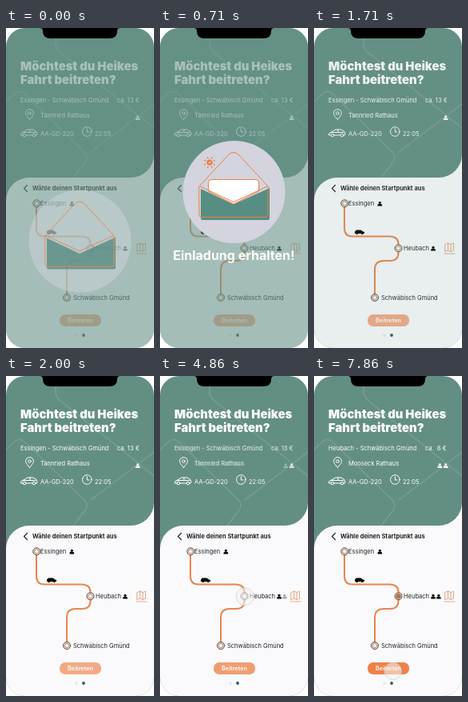
Animation, 185 px wide and 400 px high, one loop 8000 ms. Source, as an HTML page:

```html
<!DOCTYPE html>
<html lang="de">
<head>
<meta charset="utf-8">
<title>Mitfahrt</title>
<style>
  html, body { margin: 0; width: 100%; height: 100%; overflow: hidden; }
  svg { display: block; width: 100vw; height: 100vh; font: 7.5px Inter, sans-serif; }
  .line { fill: none; stroke-linecap: round; stroke-linejoin: round; }
  .title { font-size: 14.8px; font-weight: 900; }
  .bold { font-weight: 700; }
</style>
</head>
<body>
<svg viewBox="0 0 185 400">
  <defs>
    <clipPath id="screen"><rect width="185" height="400" rx="24"/></clipPath>
    <g id="person">
      <circle cy="-1.2" r="1.6"/>
      <path d="M-2.8 2.9V1.6Q-2.8 .6 -1.5 .6H1.5Q2.8 .6 2.8 1.6V2.9Z"/>
    </g>
    <g id="stop">
      <circle r="4.5" fill="#f4e6dc" stroke="#54453d"/>
      <circle r="2.6" fill="#fff" stroke="#a0694b" stroke-width=".8"/>
    </g>
  </defs>

  <g clip-path="url(#screen)">
    <rect width="185" height="400" fill="#638e84"/>
    <path class="line" stroke="#fff" stroke-opacity=".13" stroke-width="1.5"
      d="M0 92L12 81Q18 77 24 83L98 155Q104 162 98 169L84 187M62 0V20Q62 26 68 31L185 125M185 95L106 155"/>
    <path fill="#fafafc" d="M0 216A29 29 0 0 1 29 187H156A29 29 0 0 0 185 158V400H0Z"/>

    <g fill="#fff">
      <g class="title">
        <text x="18" y="53">Möchtest du Heikes</text>
        <text x="18" y="70">Fahrt beitreten?</text>
      </g>
      <text x="43" y="134.5">AA-GD-220</text>
      <text x="111" y="134.5">22:05</text>
      <g id="before">
        <text x="18" y="93">Essingen - Schwäbisch Gmünd</text>
        <text x="139" y="93">ca. 13 €</text>
        <text x="43" y="111.5">Tannried Rathaus</text>
        <use href="#person" x="164.7" y="112"/>
      </g>
      <g id="after">
        <text x="18" y="93">Heubach - Schwäbisch Gmünd</text>
        <text x="139" y="93">ca.</text>
        <text x="153.8" y="93">8 €</text>
        <text x="43" y="111.5">Mooseck Rathaus</text>
        <use href="#person" x="157.2" y="112"/>
        <use href="#person" x="164.7" y="112"/>
      </g>
    </g>
    <g class="line" stroke="#fff">
      <path d="M29.5 114.5C26 110 24.6 108.7 24.6 106.5A4.9 4.9 0 0 1 34.4 106.5C34.4 108.7 33 110 29.5 114.5Z"/>
      <circle cx="29.5" cy="106.6" r="1.8"/>
      <path d="M21 134H18.500Q18 131 21 130.500L27 127H34L38 129.500Q39.500 132 38.500 134H37M25 134H33M21 130.500H37M30 127V130"/>
      <circle cx="23" cy="134" r="1.8"/><circle cx="35" cy="134" r="1.8"/>
      <circle cx="101.3" cy="129.5" r="5.8"/>
      <path d="M101.3 125.8V130H104"/>
    </g>

    <path class="line" stroke="#222" stroke-width="1.2" d="M26.5 196.500L22.5 200.500L26.5 204.500"/>
    <path class="line" stroke="#e9854f" stroke-width="2"
      d="M38 219V250Q38 260.500 48 260.500H94Q105.500 260.500 105.500 270V281Q105.500 291 95 291H87Q76 291 76 302V337"/>
    <use href="#stop" x="38.3" y="219.3"/>
    <use href="#stop" x="105.5" y="275.3"/>
    <use href="#stop" x="76" y="337"/>
    <circle id="chosen" cx="105.5" cy="275.3" r="3.2" fill="#b87350"/>
    <g fill="#222">
      <text class="bold" x="33" y="203">Wähle deinen Startpunkt aus</text>
      <text x="43" y="222">Essingen</text>
      <text x="112" y="278">Heubach</text>
      <text x="84" y="339.7">Schwäbisch Gmünd</text>
    </g>
    <use href="#person" x="82.3" y="219.5"/>
    <use href="#person" x="149" y="275.5"/>
    <use id="passenger" href="#person" x="155.8" y="275.5"/>
    <path d="M51 257V254.500L53 252.500H58.500L61 254.300L63 255V257Z"/>
    <circle cx="53.7" cy="257" r="1.2"/><circle cx="60.3" cy="257" r="1.2"/>
    <path class="line" stroke="#e0a07c" stroke-width=".9"
      d="M164 270.500L167.500 269L171 270.500L174.500 269V278L171 279.500L167.500 278L164 279.500ZM167.500 269V278M171 270.500V279.500M163 282H176"/>

    <rect id="button" x="67" y="358" width="52" height="15" rx="7" fill="#ef8148"/>
    <text x="93" y="368" text-anchor="middle" font-size="7.3" font-weight="600" fill="#fff">Beitreten</text>
    <circle cx="88" cy="384" r="1.8" fill="#e4e7e9"/>
    <circle cx="97" cy="384" r="1.9" fill="#2f5d53"/>

    <g id="touch">
      <circle r="11" fill="#f4f4f6" fill-opacity=".55" stroke="#ccc" stroke-width=".7"/>
    </g>

    <rect id="dim" width="185" height="400" fill="#689389"/>
    <g id="invite">
      <circle id="disc" cx="92.5" cy="205" r="64" fill="#d3d4de"/>
      <g id="envelope">
        <g id="letter">
          <path fill="#fff" stroke="#ef7d43" d="M60.500 204V194Q60.500 189.500 65 189.500H119Q123.500 189.500 123.500 194V204L92 220Z"/>
          <g class="line" stroke="#ef7d43">
            <circle cx="62" cy="168" r="3.3" fill="#ef7d43"/>
            <circle id="rays" cx="62" cy="168" r="6.3" stroke-width="1.8" stroke-dasharray=".1 4.848"/>
            <path stroke="#fff" stroke-width=".8" d="M60.500 168L61.700 169.200L63.700 166.800"/>
          </g>
        </g>
        <path fill="#578d82" d="M51 201L92 220.500L137 200V238Q137 240 135 240H53Q51 240 51 238Z"/>
        <path class="line" stroke="#ef7d43"
          d="M49 198L86 158Q92 153 98 158L135 198V234Q135 236.500 132 236.500H52Q49 236.500 49 234ZM50 198L92 217.500L134 198"/>
      </g>
    </g>
    <text id="message" x="15" y="290" font-size="16" class="bold" fill="#fff">Einladung erhalten!</text>
  </g>
  <path d="M42 0Q46 0 46 4Q46 13 56 13H129Q139 13 139 4Q139 0 143 0Z"/>
</svg>

<script>
const LOOP = 8000;
const part = {};
document.querySelectorAll('svg > g [id], svg > g[id]').forEach(el => part[el.id] = el);

const span = (t, from, to) => Math.min(1, Math.max(0, (t - from) / (to - from)));
const smooth = u => u * u * (3 - 2 * u);
const easeOut = u => 1 - (1 - u) ** 2;
const mix = (a, b, u) => a + (b - a) * u;
const fade = (name, value) => part[name].setAttribute('opacity', value);
const move = (name, x, y, extra = '') =>
  part[name].setAttribute('transform', `translate(${x} ${y})${extra}`);

// The invitation rises from below and later sinks back while fading.
function drawInvite(t) {
  const leave = span(t, 1290, 1690) ** 3;
  const enter = span(t, 0, 240);
  const shown = span(t, 60, 250) * (1 - span(t, 900, 1140));
  move('invite', 0, 62 * (1 - easeOut(span(t, 0, 280))) + 100 * leave);
  fade('invite', 1 - leave);
  fade('disc', mix(0.45, 1, enter));
  fade('envelope', mix(0.8, 1, enter));
  fade('letter', shown);
  move('letter', 0, 8 * (1 - shown));
  part.rays.setAttribute('transform', `rotate(${t * 0.09} 62 168)`);

  // The message swings in from the left and settles.
  const s = t - 140;
  move('message', -14 * Math.exp(-s / 350) * Math.cos(s * Math.PI / 420), 0);
  fade('message', span(t, 30, 140) * (1 - leave));
  fade('dim', 0.58 * (1 - easeOut(span(t, 1430, 1950))));
}

function drawChoice(t) {
  const joined = smooth(span(t, 4600, 5290));
  fade('before', 1 - joined);
  fade('after', joined);
  fade('passenger', joined);
  fade('button', mix(0.66, 1, joined));
  fade('chosen', span(t, 5860, 6290));
}

function drawTouch(t) {
  const toStop = smooth(span(t, 2860, 3800));
  const toButton = smooth(span(t, 6600, 7290));
  const press = Math.sin(Math.PI * span(t, 7500, 7900));
  const x = mix(mix(58, 106.2, toStop), 98.8, toButton);
  const y = mix(mix(300, 275.8, toStop), 369, toButton);
  move('touch', x, y, ` scale(${1 - 0.1 * press})`);
  fade('touch', span(t, 2860, 3000));
}

function frame() {
  const t = performance.now() % LOOP;
  drawInvite(t);
  drawChoice(t);
  drawTouch(t);
  requestAnimationFrame(frame);
}
frame();
</script>
</body>
</html>
```
